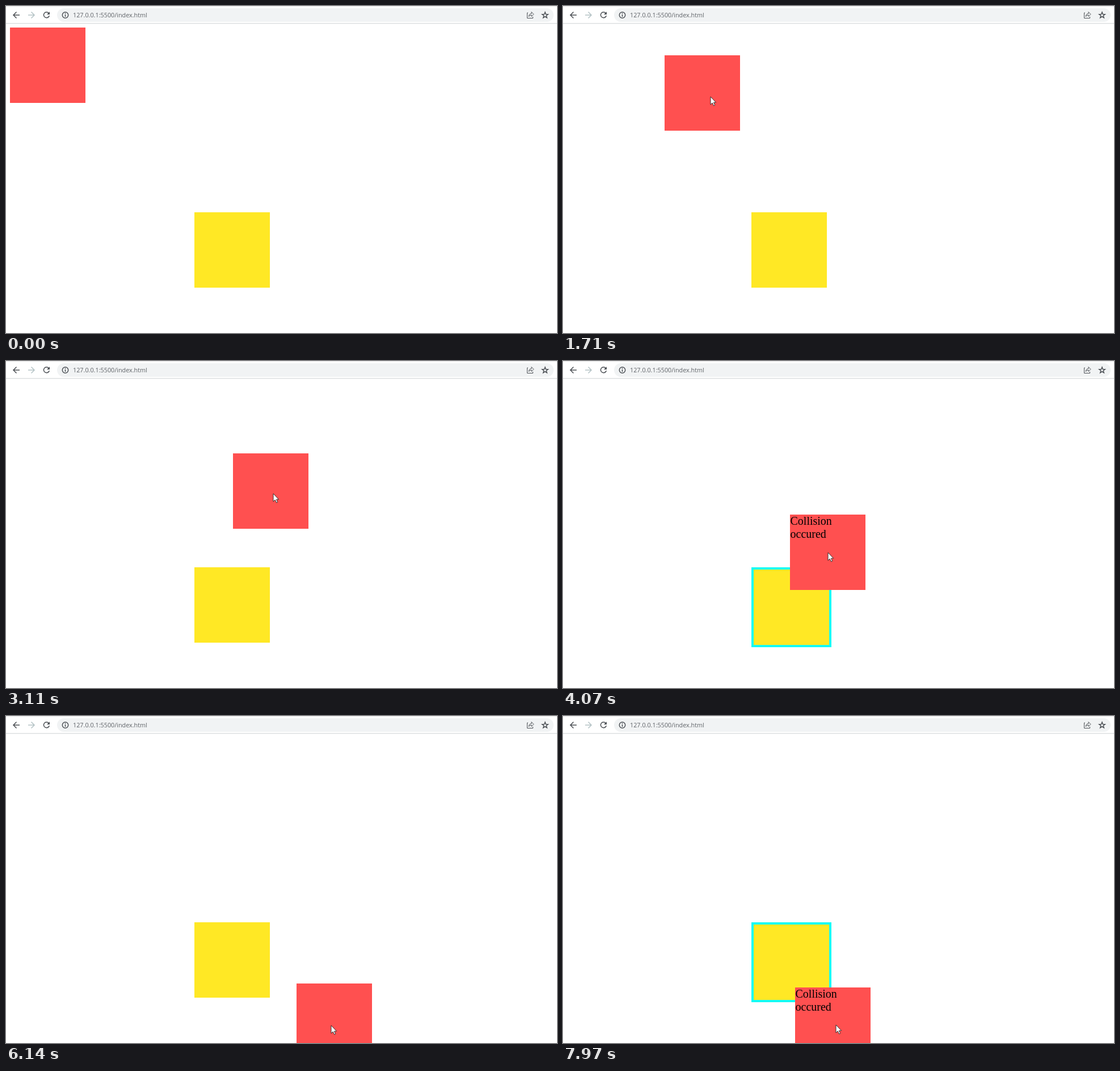
Animation of 971 by 577 pixels, one loop 8000 ms. Source, as an HTML page:

```html
<!DOCTYPE html>
<html lang="en">
<head>
<meta charset="utf-8">
<title>Collision demo</title>
<style>
  html, body { margin: 0; width: 100%; height: 100%; overflow: hidden; background: #fff; }
  svg { display: block; width: 971px; height: 577px; }
  .icon { fill: none; stroke: #4d5156; stroke-width: 1.5; }
  .url { font: 10.8px "Open Sans", "Noto Sans", sans-serif; fill: #5f6368; }
  .note { font: 20px "Liberation Serif", "Times New Roman", serif; }
</style>
</head>
<body>
<svg viewBox="0 0 971 577">
  <rect width="971" height="1" fill="#e6e6e6"/>
  <rect y="30" width="971" height="1.4" fill="#dcdee0"/>
  <rect x="90" y="4" width="875" height="24" rx="12" fill="#f1f3f4"/>
  <g class="icon">
    <path id="arrow" d="M24 16H13m5.5-5.5L13 16l5.5 5.500"/>
    <use href="#arrow" transform="matrix(-1 0 0 1 63 0)" stroke="#b5c3c6" style="stroke:#b5c3c6"/>
    <path d="M75.300 12.500A5 5 0 1 0 76.300 17"/>
    <path d="M77 10v5h-5z" fill="#4d5156" stroke="none"/>
    <circle cx="104.500" cy="16" r="5.200"/>
    <path d="M104.500 15v4m0-6.400v1.400"/>
    <path d="M920 12h-1.500v9.500h10V19M921 18.500q1-5 5-5v-3l4 4-4 4V16q-3 0-5 2.500z" stroke-width="1"/>
    <path id="star"/>
  </g>
  <text class="url" x="118" y="20">127.0.0.1:5500/index.html</text>

  <rect id="frame" x="332" y="364" width="141" height="141" fill="#12fbf5"/>
  <rect id="yellow" width="133" height="133" fill="#ffe825"/>
  <g id="red">
    <rect width="133" height="133" fill="#ff5050"/>
    <g id="note" class="note">
      <text x="0.500" y="18">Collision</text>
      <text x="0.500" y="40.500">occured</text>
    </g>
  </g>
  <path id="cursor" d="M0 0V14L3.200 11 5.500 16 7.700 15 5.500 10.200H9.600z"
        fill="#fff" stroke="#222" stroke-width=".9"/>
</svg>
<script>
const LOOP = 8000, SIZE = 133, STEP = 68;

// Every move goes on from where the last one ended. "via" holds [step, x, y];
// "grip" is where the pointer holds the red square (none: only the pointer moves).
const moves = [
  { start: 70, end: 260, via: [[1, 872, 543]], to: [181, 202] },
  { start: 460, end: 660, to: [78, 106] },
  { start: 800, end: 1240, via: [[2, 18, 31], [5, 54, 102]], to: [72, 100], grip: [73, 69] },
  { start: 1300, end: 1850, via: [[4, 128, 67], [7, 179, 87]], to: [201, 95], grip: [75, 71] },
  { start: 2180, end: 2720, via: [[2, 232, 98]], to: [385, 148], grip: [71, 68] },
  { start: 2980, end: 3730, via: [[3, 400, 163], [8, 405, 205]], to: [400, 250], grip: [70, 67] },
  { start: 3800, end: 4070, to: [400, 271], grip: [67, 67] },
  { start: 4460, end: 5210, via: [[6, 440, 301], [11, 521, 351]], to: [543, 365], grip: [70, 69] },
  { start: 5280, end: 5680, via: [[3, 555, 393]], to: [535, 432], grip: [68, 69] },
  { start: 6010, end: 6420, via: [[3, 512, 472]], to: [469, 513], grip: [66, 69] },
  { start: 7030, end: 7360, via: [[1, 429, 573], [3, 429, 558]], to: [429, 580] },
  { start: 7690, end: 7970, to: [409, 479], grip: [72, 66] }
];

const el = id => document.getElementById(id);
const place = (id, [x, y]) =>
  el(id).setAttribute("transform", `translate(${Math.round(x)} ${Math.round(y)})`);
const show = (id, on) => el(id).setAttribute("visibility", on ? "visible" : "hidden");

function along(points, step) {
  let i = 1;
  while (i < points.length - 1 && step > points[i][0]) i++;
  const [s0, x0, y0] = points[i - 1], [s1, x1, y1] = points[i];
  const p = Math.max(0, Math.min(1, (step - s0) / (s1 - s0)));
  return [x0 + (x1 - x0) * p, y0 + (y1 - y0) * p];
}

function pose(t) {
  let red = [7, 38], cursor = [-50, -50];
  for (const { start, end, via = [], to, grip } of moves) {
    if (t < start) break;
    const last = Math.round((end - start) / STEP);
    const step = 1 + Math.min(last, Math.floor((t - start) / (end - start) * last + 0.15));
    const points = [[0, ...(grip ? red : cursor)], ...via, [last + 1, ...to]];
    if (grip) {
      red = along(points, step);
      // The pointer runs slightly ahead of the square it drags.
      const [x, y] = along(points, step + 0.5);
      cursor = [x + grip[0], y + grip[1]];
    } else {
      cursor = along(points, step);
    }
  }
  return { red, cursor };
}

function draw(now) {
  const { red, cursor } = pose(now % LOOP);
  const hit = red[0] < 469 && red[1] + SIZE > 364;
  place("red", red);
  place("cursor", cursor);
  place("yellow", hit ? [336, 368] : [332, 364]);
  show("frame", hit);
  show("note", hit);
}

const tips = Array.from({ length: 10 }, (_, i) => {
  const r = i % 2 ? 2.3 : 5.5, a = i * Math.PI / 5;
  return `${950 + r * Math.sin(a)} ${16.3 - r * Math.cos(a)}`;
});
el("star").setAttribute("d", `M${tips.join("L")}z`);

const began = performance.now();
function tick() {
  draw(performance.now() - began);
  requestAnimationFrame(tick);
}
tick();
</script>
</body>
</html>
```
